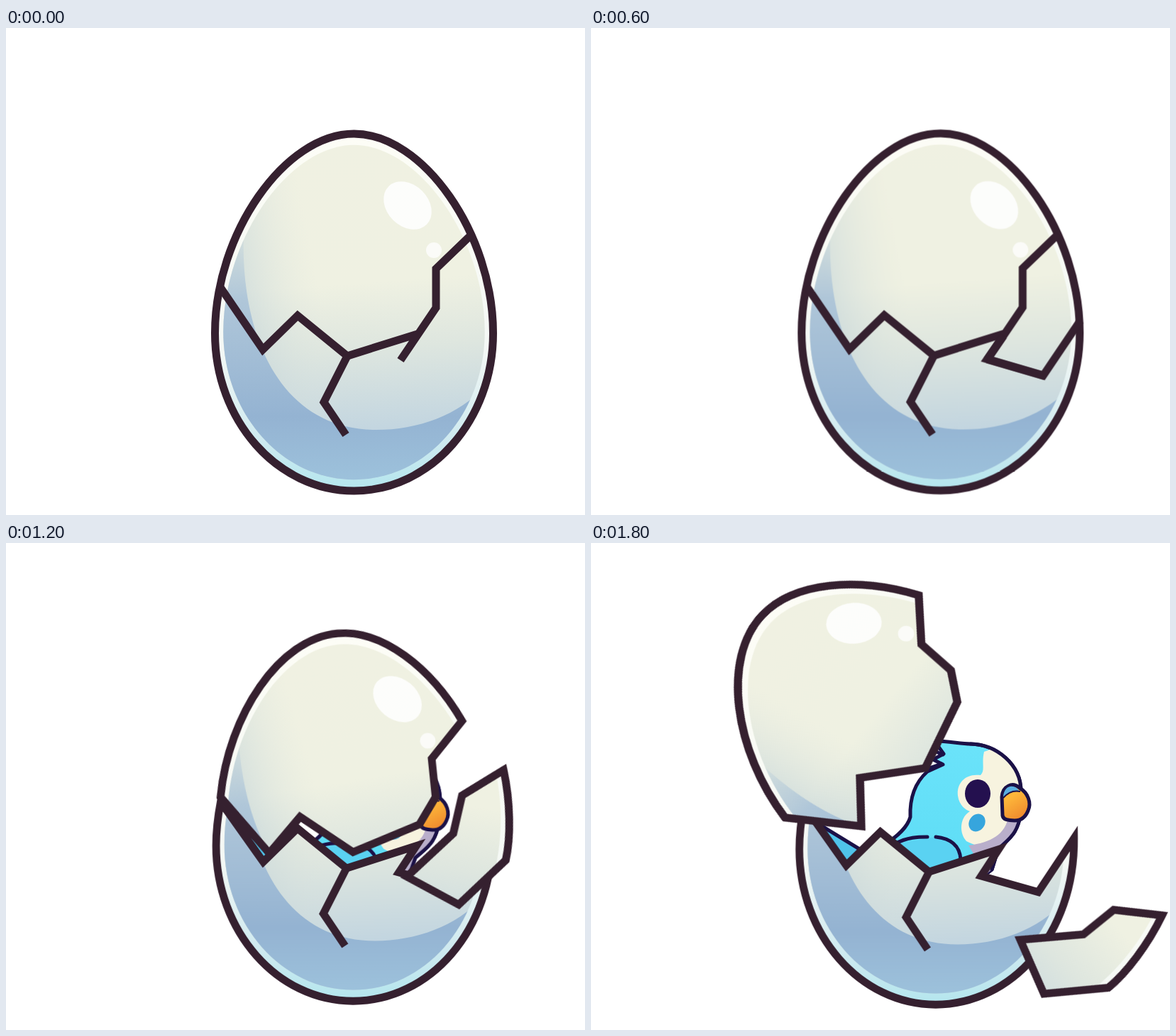
An HTML page that plays this animation: 816x686 px, repeating every 7000 ms.

```html
<!DOCTYPE html>
<html lang="en">
<head>
<meta charset="utf-8">
<title>Hatching egg</title>
<style>
html, body { margin: 0; width: 100%; height: 100%; overflow: hidden; background: #fff; }
svg { display: block; width: 816px; height: 686px; }

.line { fill: none; stroke: #35202f; stroke-width: 11; stroke-miterlimit: 6; }
.ink { stroke: #1b1147; stroke-width: 5; stroke-linejoin: round; stroke-linecap: round; }

.egg, .crack2, .crack3, .bowl, .cap, .shard, .bird { animation: 7s step-end infinite; }
.egg { animation-name: egg; }
.crack2 { animation-name: crack2; }
.crack3 { animation-name: crack3; }
.bowl { animation-name: bowl; }
.bird { animation-name: bird; transform-origin: 590px 370px; }
.cap { animation-name: cap; transform-origin: 362px 453px; }
.shard { animation-name: shard; transform-origin: 556px 468px; }

/* every pose holds for 200 ms, the last one until the loop ends */
@keyframes egg {
  0% { transform: none; visibility: visible; }
  2.857% { transform: translate(-1px, 0); visibility: visible; }
  5.714% { transform: translate(1.5px, 0); visibility: visible; }
  8.571% { transform: translate(2.3px, -.5px); visibility: visible; }
  11.428% { transform: translate(-8px, -2.5px); visibility: visible; }
  14.285%, 100% { transform: none; visibility: hidden; }
}
@keyframes crack2 { 0% { opacity: 0; } 2.857%, 100% { opacity: 1; } }
@keyframes crack3 { 0% { opacity: 0; } 5.714%, 100% { opacity: 1; } }
@keyframes bowl {
  0% { transform: none; visibility: hidden; }
  14.285% { transform: translate(-4px, 2px) scale(.99, .986); visibility: visible; }
  17.142% { transform: translate(6px, 3px) scale(.985, .985); visibility: visible; }
  20% { transform: translate(11.5px, 3px) scale(.98, .985); visibility: visible; }
  22.857% { transform: translate(13px, 3px) scale(.98, .985); visibility: visible; }
  25.714%, 100% { transform: translate(5px, 8px) scale(.98, .985); visibility: visible; }
}
@keyframes cap {
  0% { transform: none; visibility: hidden; }
  14.285% { transform: translate(-7.5px, -4px); visibility: visible; }
  17.142% { transform: translate(9px, -16px) matrix(.985, -.087, .1, .982, 0, 0); visibility: visible; }
  20% { transform: translate(22px, -29px) matrix(.975, -.2, .22, .965, 0, 0); visibility: visible; }
  22.857% { transform: translate(37px, -32px) matrix(.87, -.477, .5, .856, 0, 0); visibility: visible; }
  25.714%, 100% { transform: translate(19px, -54px) matrix(.7, -.739, .755, .666, 0, 0); visibility: visible; }
}
@keyframes shard {
  0% { transform: none; visibility: hidden; }
  14.285% { transform: translate(-7px, -4.5px) rotate(6deg); visibility: visible; }
  17.142% { transform: translate(9px, 2px) rotate(13deg); visibility: visible; }
  20% { transform: translate(54px, 43px) rotate(23.5deg); visibility: visible; }
  22.857% { transform: translate(57px, 86px) rotate(51deg); visibility: visible; }
  25.714%, 100% { transform: translate(49px, 91px) rotate(51deg); visibility: visible; }
}
@keyframes bird {
  0% { transform: none; visibility: hidden; }
  17.142% { transform: translate(5px, 13px) rotate(2deg); visibility: visible; }
  20% { transform: translate(10px, 13px) rotate(2deg); visibility: visible; }
  25.714%, 100% { transform: none; visibility: visible; }
}
</style>
</head>
<body>
<svg viewBox="0 0 816 686" xmlns="http://www.w3.org/2000/svg">
  <defs>
    <linearGradient id="rim" x1="0" y1="0" x2="0" y2="1">
      <stop offset="0" stop-color="#fdfdf6"/>
      <stop offset=".6" stop-color="#f4f8f5"/>
      <stop offset=".85" stop-color="#cfeaf0"/>
      <stop offset="1" stop-color="#b4e6ee"/>
    </linearGradient>
    <linearGradient id="shell" gradientUnits="userSpaceOnUse" x1="470" y1="150" x2="500" y2="570">
      <stop offset="0" stop-color="#f0f1e2"/>
      <stop offset=".5" stop-color="#eff1e2"/>
      <stop offset=".72" stop-color="#dee6df"/>
      <stop offset="1" stop-color="#c2d5e0"/>
    </linearGradient>
    <linearGradient id="side" gradientUnits="userSpaceOnUse" x1="325" y1="330" x2="430" y2="310">
      <stop offset="0" stop-color="#c4d5da" stop-opacity=".6"/>
      <stop offset="1" stop-color="#dfe6df" stop-opacity="0"/>
    </linearGradient>
    <linearGradient id="shade" gradientUnits="userSpaceOnUse" x1="0" y1="270" x2="0" y2="640">
      <stop offset="0" stop-color="#b5cad8" stop-opacity="0"/>
      <stop offset=".3" stop-color="#a9c2d8" stop-opacity=".85"/>
      <stop offset=".75" stop-color="#94b3d2"/>
      <stop offset="1" stop-color="#9dc2dc"/>
    </linearGradient>
    <linearGradient id="plume" x1="0" y1="0" x2="0" y2="1">
      <stop offset="0" stop-color="#6be3fa"/>
      <stop offset="1" stop-color="#5cdcf5"/>
    </linearGradient>
    <linearGradient id="beak" x1="0" y1="0" x2=".5" y2="1">
      <stop offset=".4" stop-color="#fdb63a"/>
      <stop offset="1" stop-color="#f08c2e"/>
    </linearGradient>

    <path id="eggShape" d="M490.5 149C588 149 686.5 290 686.5 430C686.5 552 599 652 490.5 652C382 652 294.5 552 294.5 430C294.5 290 393 149 490.5 149Z"/>
    <path id="bowlShape" d="M301 367L362 453L411 405L481 462L581 430L556 468L638 491L689.5 414C691 552 599 652 490.5 652C382 652 294.5 552 294.5 430C294.5 409 297 388 301 367Z"/>
    <path id="capShape" d="M301 367L362 453L411 405L481 462L579 431L606 394L606 339L654.5 289C617.7 208.6 553.9 149 490.5 149C407.6 149 324 250.9 301 367Z"/>
    <path id="shardShape" d="M655 291L606 339L606 394L556 468L636 490L686.5 414C686.5 381 674.4 332 655 291Z"/>
    <path id="branch" d="M481 462L448 527L479 573"/>

    <clipPath id="eggClip"><use href="#eggShape"/></clipPath>
    <clipPath id="innerClip"><use href="#eggShape" transform="translate(490.5 400.5) scale(.94 .937) translate(-490.5 -400.5)"/></clipPath>
    <clipPath id="bowlClip"><use href="#bowlShape"/></clipPath>
    <clipPath id="capClip"><use href="#capShape"/></clipPath>
    <clipPath id="shardClip"><use href="#shardShape"/></clipPath>
    <clipPath id="bodyClip"><use href="#body"/></clipPath>

    <g id="art">
      <use href="#eggShape" fill="url(#rim)"/>
      <g clip-path="url(#innerClip)">
        <rect x="290" y="140" width="410" height="520" fill="url(#shell)"/>
        <rect x="290" y="140" width="410" height="520" fill="url(#side)"/>
        <path fill="url(#shade)" d="M336 270C325 420 380 566 522 566C580 566 640 545 676 503L720 700H250V270Z"/>
      </g>
      <ellipse cx="566" cy="250" rx="29" ry="38" transform="rotate(-45 566 250)" fill="#fff" opacity=".85"/>
      <circle cx="603" cy="313" r="11" fill="#fff" opacity=".75"/>
    </g>
  </defs>

  <g class="bird">
    <path fill="#4fc3ea" d="M312 392L388 436L420 470L370 475Z"/>
    <path class="ink" fill="none" d="M316 393L388 437"/>
    <path id="body" class="ink" fill="url(#plume)" d="M484 279C505 279 520 283 535 283C572 284 606 312 606 350C607 375 606 392 597 407C591 417 580 425 574 431L565 460L540 480H400L412 426C434 412 446 400 450 386C449 360 456 338 474 322L496 312L482 305L497 297Z"/>
    <g clip-path="url(#bodyClip)">
      <path fill="#f7f3df" d="M554 294C550 310 556 320 549 327C526 324 515 340 517 356C519 370 528 376 534 378C520 386 518 408 529 420C560 436 590 430 615 400V300L580 285Z"/>
      <path fill="#b9aecb" d="M532 426C564 422 584 410 588 386L615 380V420L560 470Q540 440 532 426Z"/>
    </g>
    <path class="ink" fill="none" d="M535 283C572 284 606 312 606 350C607 375 606 392 597 407C591 417 580 425 574 431L565 460"/>
    <path class="ink" fill="none" d="M484 293L496 298M477 317L494 311"/>
    <path class="ink" fill="#5ad2f2" d="M428 424C446 414 462 414 474 414M486 414C506 416 520 426 521 446L478 462L428 424" stroke-width="4"/>
    <ellipse cx="545" cy="353" rx="18" ry="20" fill="#24104f"/>
    <ellipse cx="544" cy="394" rx="11" ry="13" transform="rotate(35 544 394)" fill="#36a5dd"/>
    <path class="ink" fill="url(#beak)" d="M579 358C580 342 594 336 604 345C616 352 621 366 616 377C612 387 606 391 597 391C588 391 581 390 580 384Z"/>
    <path fill="#59aee0" d="M581 357C582 344 592 339 601 346L604 350C595 348 587 352 581 359Z"/>
    <path fill="none" stroke="#1b1147" stroke-width="2" d="M581 359C588 351 596 348 605 350"/>
  </g>

  <g class="bowl">
    <use href="#art" clip-path="url(#bowlClip)"/>
    <use href="#bowlShape" class="line"/>
    <use href="#branch" class="line"/>
  </g>
  <g class="cap">
    <use href="#art" clip-path="url(#capClip)"/>
    <use href="#capShape" class="line"/>
  </g>
  <g class="shard">
    <use href="#art" clip-path="url(#shardClip)"/>
    <use href="#shardShape" class="line"/>
  </g>

  <g class="egg">
    <use href="#art" clip-path="url(#eggClip)"/>
    <use href="#eggShape" class="line"/>
    <path class="line" d="M302 365L362 453L411 405L481 462L580 431M656 291L606 339V394L556 468"/>
    <use href="#branch" class="line"/>
    <path class="line crack2" d="M579 434L556 467L638 491"/>
    <path class="line crack3" d="M556 467L635 490L687 413"/>
  </g>
</svg>
</body>
</html>
```
